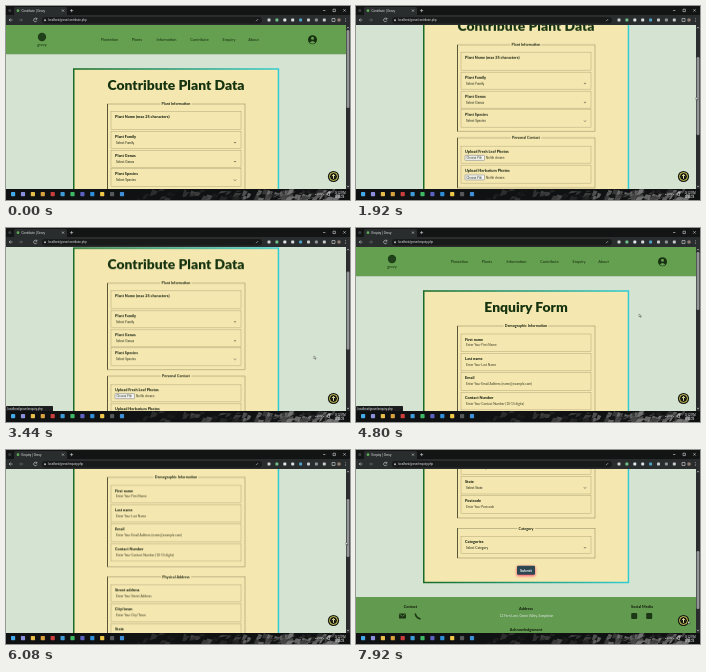
Animation, 344 px wide and 194 px high, one loop 8 s. Source, as an HTML page:

```html
<!DOCTYPE html>
<html lang="en">
<head>
<meta charset="utf-8">
<title>Plant forms</title>
<style>
html, body { margin: 0; width: 100%; height: 100%; overflow: hidden; background: #111; }
svg { display: block; width: 344px; height: 194px; }
text { font-family: Lato, "Open Sans", sans-serif; font-size: 3.2px; fill: #141f0e; }
.mid { text-anchor: middle; }
.title { font-size: 13.9px; font-weight: 900; fill: #15330f; }
.bold { font-size: 3.85px; font-weight: 800; }
.hint { fill: #3a3c24; }
.legend { font-size: 3.7px; font-weight: 700; stroke: #f5e7b0; stroke-width: 3px; paint-order: stroke; }
.nav { font-size: 3.9px; fill: #16300f; }
.ui { font-family: "Liberation Sans", Arial, sans-serif; font-size: 2.9px; }
.light { fill: #e4e6e8; }
.set { fill: none; stroke: #33391c; stroke-width: .5; opacity: .55; }
.side { fill: none; stroke: #2a3016; stroke-width: .7; }
.row { fill: none; stroke: #55532c; stroke-width: .35; opacity: .6; }
.line { fill: none; stroke: #d2d4d6; stroke-width: .6; }
.glow { filter: drop-shadow(0 1.5px 1.8px #ff3b62); }

.first, .second, .status { animation: 8s step-end infinite; }
.first { animation-name: first; }
.second { animation-name: second; }
.status { animation-name: status; }
.scroll1, .scroll2, .thumb1, .thumb2, .mouse { animation: 8s linear infinite; }
.scroll1 { animation-name: scroll1; }
.scroll2 { animation-name: scroll2; }
.thumb1 { animation-name: thumb1; }
.thumb2 { animation-name: thumb2; }
.mouse { animation-name: mouse; }

@keyframes first { 0% { opacity: 1 } 54%, 100% { opacity: 0 } }
@keyframes second { 0% { opacity: 0 } 54%, 100% { opacity: 1 } }
@keyframes status { 0% { opacity: 0 } 41% { opacity: 1 } 63%, 100% { opacity: 0 } }
@keyframes scroll1 {
  0%, 18.5% { transform: translateY(0) }
  24% { transform: translateY(-59px) }
  32%, 37% { transform: translateY(-154px) }
  43% { transform: translateY(-43px) }
  46%, 100% { transform: translateY(0) }
}
@keyframes thumb1 {
  0%, 18.5% { transform: translateY(0) }
  24% { transform: translateY(27px) }
  32%, 37% { transform: translateY(70.5px) }
  43% { transform: translateY(19.7px) }
  46%, 100% { transform: translateY(0) }
}
@keyframes scroll2 {
  0%, 69% { transform: translateY(0) }
  76% { transform: translateY(-70.5px) }
  88%, 100% { transform: translateY(-218px) }
}
@keyframes thumb2 {
  0%, 69% { transform: translateY(0) }
  76% { transform: translateY(25px) }
  88%, 100% { transform: translateY(77px) }
}
@keyframes mouse {
  0%, 8% { transform: translate(346px, 58px) }
  17%, 18.5% { transform: translate(340px, 64px) }
  24% { transform: translate(340px, 91px) }
  32%, 36% { transform: translate(336px, 147px) }
  43% { transform: translate(308px, 128px) }
  52%, 54.5% { transform: translate(223px, 34px) }
  60% { transform: translate(283px, 86px) }
  67%, 69% { transform: translate(340px, 67px) }
  76% { transform: translate(340px, 92px) }
  88% { transform: translate(340px, 146px) }
  99%, 100% { transform: translate(332px, 171px) }
}
</style>
</head>
<body>
<svg id="stage" viewBox="0 0 344 194"></svg>
<script>
const rect = (x, y, w, h, fill, more = '') =>
  `<rect x="${x}" y="${y}" width="${w}" height="${h}" fill="${fill}" ${more}/>`;
const text = (x, y, s, cls = '') => `<text x="${x}" y="${y}" class="${cls}">${s}</text>`;
const path = (d, cls = 'line', more = '') => `<path d="${d}" class="${cls}" ${more}/>`;
const disc = (x, y, r, fill, more = '') => `<circle cx="${x}" cy="${y}" r="${r}" fill="${fill}" ${more}/>`;
const group = (cls, s) => `<g class="${cls}">${s}</g>`;

function fieldset(name, top, bottom) {
  return `<rect class="set" x="101.5" y="${top}" width="137.5" height="${bottom - top}"/>` +
    path(`M101.5 ${top}V${bottom}`, 'side') +
    text(170, top + 1.2, name, 'legend mid');
}

// y is the middle of the label
function field(y, label, hint, kind) {
  let s = `<rect class="row" x="105" y="${y - 5.2}" width="130" height="17.4"/>` +
    text(109, y + 1.3, label, 'bold');
  if (kind === 'file') {
    s += rect(109, y + 4, 19.5, 5, '#f6f6f2', 'stroke="#4e5568" stroke-width=".4" rx=".6"') +
      text(110.5, y + 7.6, 'Choose File', 'ui') + text(130, y + 7.6, 'No file chosen', 'ui');
  } else if (hint) {
    s += text(110, y + 7.1, hint, kind === 'select' ? '' : 'hint');
  }
  if (kind === 'select') s += path(`M228 ${y + 5.6}l1 1 1-1`, '', 'fill="none" stroke="#222" stroke-width=".6"');
  return s;
}

function header() {
  const links = [[103.5, 'Plantation'], [131, 'Plants'], [160.5, 'Information'],
    [193.5, 'Contribute'], [223, 'Enquiry'], [247.5, 'About']];
  return rect(0, 48, 344, .8, '#b5c9b0') + rect(0, 19, 344, 29, '#659f50') +
    disc(36, 31, 4.2, '#20401a') + text(36, 40.3, 'grovy', 'nav mid') +
    links.map(([x, s]) => text(x, 35.2, s, 'nav mid')).join('') +
    disc(306.5, 33.7, 4.5, '#17300f') + disc(306.5, 32.2, 1.5, '#659f50') +
    path('M303.7 36.7q2.8-3.6 5.6 0q-2.8 2.2-5.6 0', '', 'fill="#659f50"');
}

function footer(y) {
  const names = [[126, 21, 'Amy Ferrol'], [149, 30, 'Zed Hui Kangsan'], [181, 32, 'Clement Robyn Goh']];
  return rect(0, y, 344, 75, '#629b4f') +
    text(54.5, y + 11.2, 'Contact', 'bold mid') + text(170, y + 12.7, 'Address', 'bold mid') +
    text(286, y + 11.2, 'Social Media', 'bold mid') +
    rect(43, y + 16.4, 7, 5, '#1d3615', 'rx=".5"') +
    path(`M43.3 ${y + 17}l3.2 2.2 3.2-2.2`, '', 'fill="none" stroke="#629b4f" stroke-width=".6"') +
    path(`M59.2 ${y + 16.5}q.8 4.6 5.4 5.4`, '', 'fill="none" stroke="#1d3615" stroke-width="1.5"') +
    rect(275.2, y + 16, 6, 6, '#1d3615', 'rx="1"') + rect(290.2, y + 16, 6, 6, '#1d3615', 'rx="1"') +
    text(170.5, y + 19.8, '12 Fern Lane, Green Valley, Sampleton', 'light mid') +
    text(170, y + 33.8, 'Acknowledgement', 'bold mid') +
    names.map(([x, w, s]) => rect(x, y + 39, w, 9, '#f5e7b0', 'rx=".8"') +
      text(x + w / 2, y + 44.6, s, 'mid')).join('') +
    rect(157, y + 55, 26, 9, '#263f43', 'rx="1"') + text(170, y + 60.8, 'Submission', 'bold mid light');
}

function page(title, bottom, body) {
  return rect(0, 19, 344, 480, '#d5e3d2') + header() +
    rect(67.75, 63, 204.7, bottom - 63, '#f5e7b0', 'stroke="url(#edge)" stroke-width="1.5"') +
    text(170, 83.6, title, 'title mid') + body +
    group('glow', rect(161, bottom - 16.8, 18, 9, '#2c4752', 'rx="1"')) +
    text(170, bottom - 11, 'Submit', 'bold mid light') + footer(bottom + 14.5);
}

const contribute = page('Contribute Plant Data', 261.5,
  fieldset('Plant Information', 98, 184.5) +
  field(111, 'Plant Name (max 25 characters)') +
  field(130.5, 'Plant Family', 'Select Family', 'select') +
  field(149.5, 'Plant Genus', 'Select Genus', 'select') +
  field(168, 'Plant Species', 'Select Species', 'select') +
  fieldset('Personal Contact', 191, 241) +
  field(204.5, 'Upload Fresh Leaf Photos', '', 'file') +
  field(224, 'Upload Herbarium Photos', '', 'file'));

const enquiry = page('Enquiry Form', 350.5,
  fieldset('Demographic Information', 98, 187.5) +
  field(111.2, 'First name', 'Enter Your First Name') +
  field(130.7, 'Last name', 'Enter Your Last Name') +
  field(150, 'Email', 'Enter Your Email Address (name@example.com)') +
  field(169.7, 'Contact Number', 'Enter Your Contact Number (10-15 digits)') +
  fieldset('Physical Address', 197.5, 286) +
  field(210.6, 'Street address', 'Enter Your Street Address') +
  field(230, 'City/town', 'Enter Your City/Town') +
  field(249.8, 'State', 'Select State', 'select') +
  field(269, 'Postcode', 'Enter Your Postcode') +
  fieldset('Category', 296.3, 326) +
  field(309.6, 'Categories', 'Select Category', 'select'));

function chrome() {
  const tools = ['#d0d0d0', '#6fc08a', '#dfe6ec', '#d9dce0', '#4ea3c9', '#c8cace', '#8f9498', '#c8cace'];
  return rect(0, 0, 344, 9.5, '#131514') + rect(0, 9, 344, 10, '#2a2d2d') +
    rect(8, 1, 53, 9, '#2a2d2d', 'rx="1.5"') + disc(3.8, 4.5, 1.6, '#3b3e40') +
    disc(12, 4.7, 1.4, '#5caa58') + path('M56 3.6l2 2m0-2l-2 2M64 4.6h3.2M65.6 3v3.2') +
    path('M6.5 14h-3.4l1.5-1.5M3.1 14l1.5 1.5') +
    path('M13 14h3.4l-1.5-1.5M16.4 14l-1.5 1.5', 'line', 'opacity=".4"') +
    path('M30.7 13a1.7 1.7 0 1 0 .2 1.6M30.9 11.8v1.4h-1.4') +
    rect(36, 11, 220, 6.4, '#191b1b', 'rx="3.2"') + disc(39, 14.2, 1, '#b5b8bb') +
    path('M250 15.2l2-2') +
    tools.map((c, i) => rect(261.5 + i * 7.9, 12.6, 3, 3, c, 'rx=".8"')).join('') +
    path('M326 12.5h3v3h-3z') + disc(333, 14, 1.8, '#8f7d74') + path('M339.5 12.3v.7m0 .8v.7m0 .8v.7') +
    path('M317 4.5h2.4M327 3.2h2.4v2.4h-2.4zM337.3 3.2l2.4 2.4m0-2.4l-2.4 2.4') +
    group('first', text(15.5, 5.8, 'Contribute | Grovy', 'ui light') +
      text(42, 15.3, 'localhost/grove/contribute.php', 'ui light')) +
    group('second', text(15.5, 5.8, 'Enquiry | Grovy', 'ui light') +
      text(42, 15.3, 'localhost/grove/enquiry.php', 'ui light'));
}

// rough rock texture of the wallpaper, brighter to the right
function rocks() {
  let seed = 7, s = '';
  const rnd = () => (seed = seed * 16807 % 2147483647) / 2147483647;
  for (let i = 0; i < 130; i++) {
    const x = 130 + 205 * Math.sqrt(rnd()), y = 183 + 9 * rnd(), w = 2 + 5 * rnd();
    const tone = Math.round(20 + 130 * rnd() * (x - 100) / 235);
    s += path(`M${x} ${y}l${w} ${2 * rnd()}l${-w / 2} ${1 + 3 * rnd()}l${-w} ${2 * rnd()}z`, '',
      `fill="rgb(${tone},${tone},${tone})"`);
  }
  return s;
}

function taskbar() {
  const icons = ['#43a9e8', '#8b90dc', '#e9bd4c', '#d8a13f', '#c93f3d', '#3f9bd8',
    '#3fb865', '#5b62c0', '#2f8fd8', '#efc74a', '#55595b', '#3f8fd8'];
  return rect(0, 183, 344, 11, '#0f1112') + rocks() + rect(0, 183, 130, 11, '#0f1112') +
    rect(334, 183, 10, 11, '#0f1112', 'opacity=".6"') +
    icons.map((c, i) => rect(5 + i * 9.9, 186, 4.2, 4.2, c, 'rx=".7"')).join('') +
    path('M309 189l1.2-1.2 1.2 1.2M315 189q1.5-2.4 3 0M321 187h1l1.4-1v4l-1.4-1h-1z') +
    text(329, 187.6, '3:12 PM', 'ui light') + text(329, 191.6, '5/11/24', 'ui light');
}

const fixed = rect(340, 19, 4, 164, '#2b2c2d') +
  path('M341 22.3l1-1.3 1 1.3M341 179.8l1 1.3 1-1.3') +
  group('first', group('thumb1', rect(340.6, 24, 2.8, 78, '#929596', 'rx="1.2"'))) +
  group('second', group('thumb2', rect(340.6, 24, 2.8, 58, '#929596', 'rx="1.2"'))) +
  disc(327.5, 170.5, 5.6, '#14170e') + disc(327.5, 170.5, 4, 'none', 'stroke="#e9df69" stroke-width=".9"') +
  path('M327.5 172.8v-4.2m-1.6 1.6l1.6-1.6 1.6 1.6', '', 'fill="none" stroke="#f3ecab" stroke-width=".9"') +
  group('status', rect(0, 178, 47, 5.3, '#1b1d1e', 'rx=".8"') +
    text(1.5, 181.7, 'localhost/grove/enquiry.php', 'ui light'));

const cursor = group('mouse', path('M0 0v3l.8-.7.5 1.1.5-.2-.5-1.1h1z', '', 'fill="#fff" stroke="#111" stroke-width=".35"'));

document.getElementById('stage').innerHTML =
  `<defs><linearGradient id="edge" gradientUnits="userSpaceOnUse" x1="67" y1="0" x2="273" y2="0">
    <stop offset="0" stop-color="#176b25"/><stop offset="1" stop-color="#31cdd0"/>
  </linearGradient></defs>` +
  group('first', group('scroll1', contribute)) +
  group('second', group('scroll2', enquiry)) +
  fixed + chrome() + taskbar() + cursor;
</script>
</body>
</html>
```
